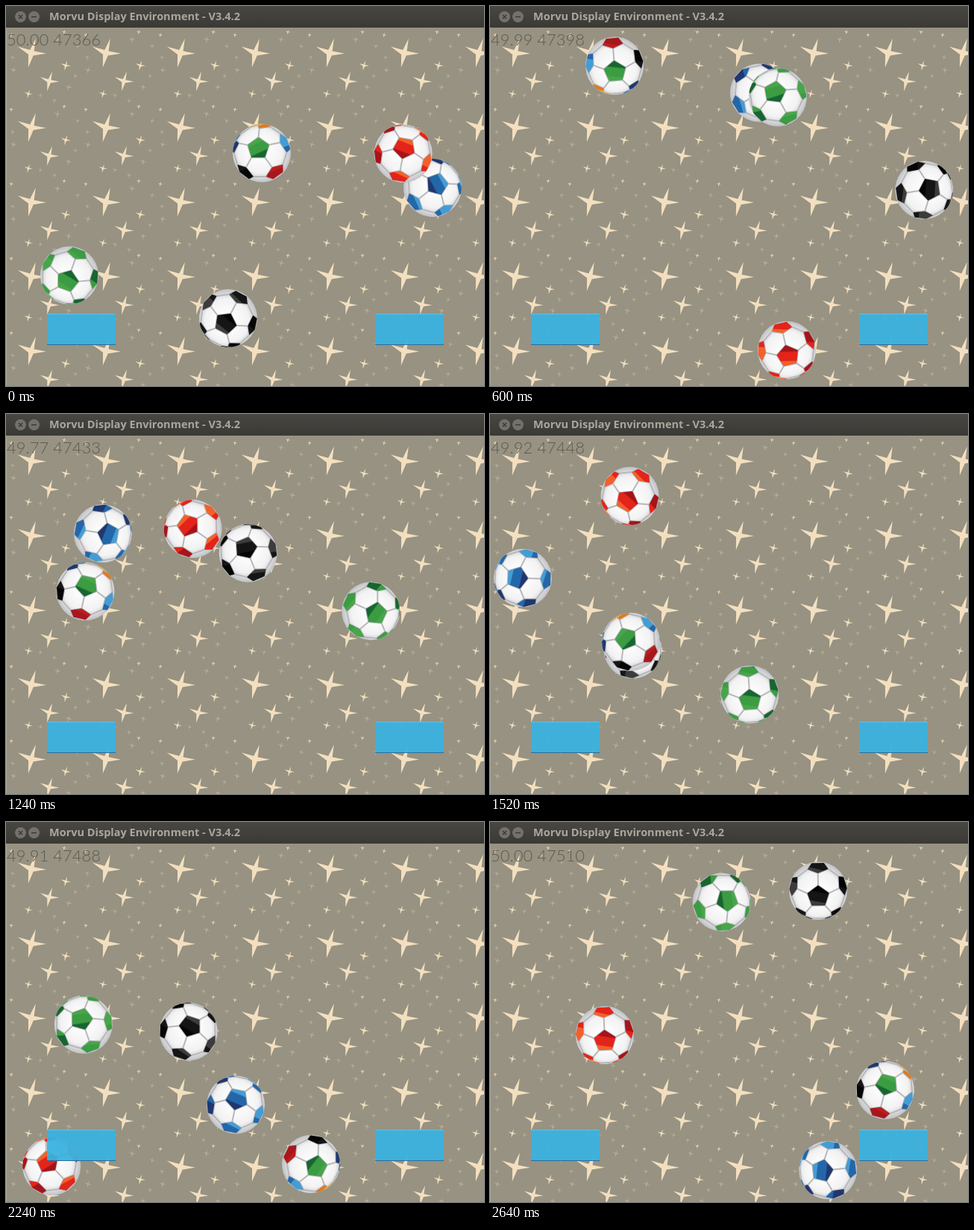
An HTML page with a canvas for the animation above (2740 ms loop, 641x510 px).

```html
<!DOCTYPE html>
<html lang="en">
<head>
<meta charset="utf-8">
<title>Bouncing balls</title>
<style>
  html, body { margin: 0; width: 100%; height: 100%; overflow: hidden; background: #979282; }
  canvas { display: block; }
</style>
</head>
<body>
<canvas id="stage" width="641" height="510"></canvas>
<script>
const W = 641, H = 510, R = 39, BAR = 29, LOOP = 2740;
const EYE = 7; // viewing distance in ball radii
const ctx = document.getElementById('stage').getContext('2d');
const BOUNDS = { left: 41, right: 601, top: 69, bottom: 469 };

// Each palette runs from the lit side of a patch to its dark side.
const RED = ['#f2602a', '#e3241a', '#a5141a'];
const BLUE = ['#459cd4', '#2467a8', '#20376f'];
const GREEN = ['#48a54a', '#3b9c42', '#176630'];
const BLACK = ['#3c3c3c', '#151515', '#050505'];
const ORANGE = ['#e5a63c', '#dc7a26', '#a85a1c'];
const CRIMSON = ['#b8201f', '#a9171c', '#861015'];
const MIXED = [GREEN, CRIMSON, BLACK, BLUE, ORANGE, BLUE];

// Start, velocity per tick, lean of the front patch in degrees, spin per tick.
const balls = [
  { x: 298, y: 419, vx: 8.88, vy: 8.6, lean: 118, spin: 7.3, patches: [BLACK] },
  { x: 572, y: 244, vx: -6.6, vy: -3.985, lean: 321, spin: 11.48, patches: [BLUE] },
  { x: 343, y: 197.5, vx: -5.5, vy: -4.51, lean: 234, spin: -4.65, patches: MIXED },
  { x: 85, y: 361.5, vx: 9.4, vy: -7.47, lean: 110, spin: 4.1, patches: [GREEN] },
  { x: 532.7, y: 198, vx: -4.21, vy: 8.8, lean: 280, spin: -6.34, patches: [RED] }
];

const rad = deg => deg * Math.PI / 180;
const dot = (a, b) => a[0] * b[0] + a[1] * b[1] + a[2] * b[2];

// Icosahedron corners, tilted so that the front one sits a little above the middle.
function corners() {
  const ring = (z, turn) => [0, 1, 2, 3, 4].map(k => {
    const a = rad(turn + 72 * k), r = Math.sqrt(0.8);
    return [r * Math.cos(a), r * Math.sin(a), z];
  });
  const z = Math.sqrt(0.2), s = Math.sin(rad(11)), c = Math.cos(rad(11));
  return [[0, 0, 1], ...ring(z, 90), ...ring(-z, 126), [0, 0, -1]]
    .map(([x, y, z]) => [x, y * c - z * s, y * s + z * c]);
}

// Perspective view of the sphere; points behind the horizon go past the rim.
function project([x, y, z]) {
  const horizon = 1 / EYE;
  const k = z < horizon
    ? R * (1 + horizon - z) / Math.hypot(x, y)
    : R * Math.sqrt(EYE * EYE - 1) / (EYE - z);
  return [x * k, y * k];
}

// Point one third of the way from a to b.
function third(a, b) {
  const p = a.map((v, i) => 2 * v + b[i]), len = Math.hypot(...p);
  return project(p.map(v => v / len));
}

const patches = [], seams = new Path2D();
const points = corners();
points.forEach((a, i) => {
  const around = points.filter(b => b !== a && dot(a, b) > 0.4)
    .sort((b, c) => Math.atan2(b[1] - a[1], b[0] - a[0]) - Math.atan2(c[1] - a[1], c[0] - a[0]));
  for (const b of around) {
    if (points.indexOf(b) < i || a[2] + b[2] < -0.2) continue;
    seams.moveTo(...third(a, b));
    seams.lineTo(...third(b, a));
  }
  if (i > 5) return;
  const shape = new Path2D();
  around.forEach(b => shape.lineTo(...third(a, b)));
  shape.closePath();
  patches.push({ shape, y: project(a)[1], half: i ? 11 : 15 });
});

function patchFill({ y, half }, [light, mid, dark]) {
  const g = ctx.createLinearGradient(3, y - half, -3, y + half);
  [[0, light], [0.28, light], [0.32, mid], [0.68, mid], [0.74, dark], [1, dark]]
    .forEach(stop => g.addColorStop(...stop));
  return g;
}

function drawBall(ball) {
  ctx.save();
  ctx.translate(ball.x, ball.y);
  ctx.rotate(rad(ball.lean - 270));
  ctx.beginPath();
  ctx.arc(0, 0, R, 0, 7);
  ctx.clip();
  const skin = ctx.createRadialGradient(0, -7, 8, 0, -2, R + 2);
  skin.addColorStop(0, '#fff');
  skin.addColorStop(0.65, '#f2f2f3');
  skin.addColorStop(1, '#bfc0c4');
  ctx.fillStyle = skin;
  ctx.fillRect(-R, -R, 2 * R, 2 * R);
  ctx.strokeStyle = '#b8b8bb';
  ctx.lineWidth = 2;
  ctx.stroke(seams);
  patches.forEach((patch, i) => {
    ctx.stroke(patch.shape);
    ctx.fillStyle = patchFill(patch, ball.patches[i % ball.patches.length]);
    ctx.fill(patch.shape);
  });
  ctx.restore();
}

// Four thin arms, slightly askew.
function drawStar(c, x, y, r) {
  const arms = [2, 102, 205, 287];
  const at = (deg, len) => c.lineTo(x + len * Math.cos(rad(deg)), y + len * Math.sin(rad(deg)));
  c.beginPath();
  arms.forEach((deg, k) => {
    at(deg, r);
    at((deg + (arms[k + 1] || 362)) / 2, r * 0.22);
  });
  c.fill();
}

function makeBackdrop() {
  const canvas = document.createElement('canvas');
  canvas.width = W;
  canvas.height = H;
  const c = canvas.getContext('2d');
  c.fillStyle = '#979282';
  c.fillRect(0, 0, W, H);
  const bright = [[34, 63, 20], [58, 101, 13.5], [80, 80, 7], [30, 18, 6], [7, 39, 3.5], [78, 35, 3.5]];
  const faint = [[69, 45, 5], [96, 54, 4], [9, 69, 4], [10, 86, 5], [93, 94, 4], [46, 20, 4], [84, 9, 5], [65, 27, 4]];
  for (let x = -100; x <= W; x += 100) for (let y = -100; y <= H; y += 100) {
    c.fillStyle = '#b7ae99';
    faint.forEach(([sx, sy, r]) => drawStar(c, x + sx, y + sy, r));
    c.fillStyle = '#f3dfbf';
    bright.forEach(([sx, sy, r]) => drawStar(c, x + sx, y + sy, r));
  }
  c.fillStyle = '#aaa69a';
  c.fillRect(0, BAR, 1, H);

  const bar = c.createLinearGradient(0, 0, 0, BAR);
  bar.addColorStop(0, '#484742');
  bar.addColorStop(1, '#3a3935');
  c.fillStyle = bar;
  c.fillRect(0, 0, W, BAR);
  for (const x of [19.5, 37.5]) {
    c.fillStyle = '#73716a';
    c.beginPath();
    c.arc(x, 14.5, 7.5, 0, 7);
    c.fill();
  }
  c.strokeStyle = '#3b3a36';
  c.lineWidth = 1.5;
  c.beginPath();
  for (const [x1, y1, x2, y2] of [[17, 12, 22, 17], [22, 12, 17, 17], [34, 14.5, 41, 14.5]]) {
    c.moveTo(x1, y1);
    c.lineTo(x2, y2);
  }
  c.stroke();
  c.fillStyle = '#aaa79d';
  c.font = 'bold 14.5px "Open Sans", sans-serif';
  c.fillText('Morvu Display Environment - V3.4.2', 58, 19);
  return canvas;
}

function drawPaddle(x) {
  const box = (color, y, h) => { ctx.fillStyle = color; ctx.fillRect(x, y, 92, h); };
  box('rgba(58,178,224,.94)', 413, 42);
  box('#62bfe2', 413, 1);
  box('#2a6d9c', 454, 1);
}

function bounce(pos, v, low, high) {
  return pos < low ? Math.abs(v) : pos > high ? -Math.abs(v) : v;
}

function ballAt(start, ticks) {
  const b = { ...start };
  for (let i = 0; i < ticks; i++) {
    b.x += b.vx;
    b.y += b.vy;
    b.vx = bounce(b.x, b.vx, BOUNDS.left, BOUNDS.right);
    b.vy = bounce(b.y, b.vy, BOUNDS.top, BOUNDS.bottom);
  }
  b.lean += b.spin * ticks;
  return b;
}

const backdrop = makeBackdrop();
const rates = ['50.00', '49.99', '49.77', '49.92', '49.91', '50.00'];

function draw(time) {
  const step = Math.min(66, Math.floor(time % LOOP / 40));
  const ticks = Math.max(0, Math.round(step * 2.2 - 1.2));
  ctx.drawImage(backdrop, 0, 0);
  ctx.save();
  ctx.beginPath();
  ctx.rect(0, BAR, W, H);
  ctx.clip();
  balls.forEach(ball => drawBall(ballAt(ball, ticks)));
  ctx.restore();
  drawPaddle(55);
  drawPaddle(495);
  ctx.fillStyle = '#5e5b50';
  ctx.font = '300 22px Lato, sans-serif';
  ctx.fillText(`${rates[Math.floor((ticks + 12) / 30)]} ${47366 + ticks}`, 1, 53);
}

const begin = performance.now();
function frame() {
  draw(performance.now() - begin);
  requestAnimationFrame(frame);
}
frame();
</script>
</body>
</html>
```
